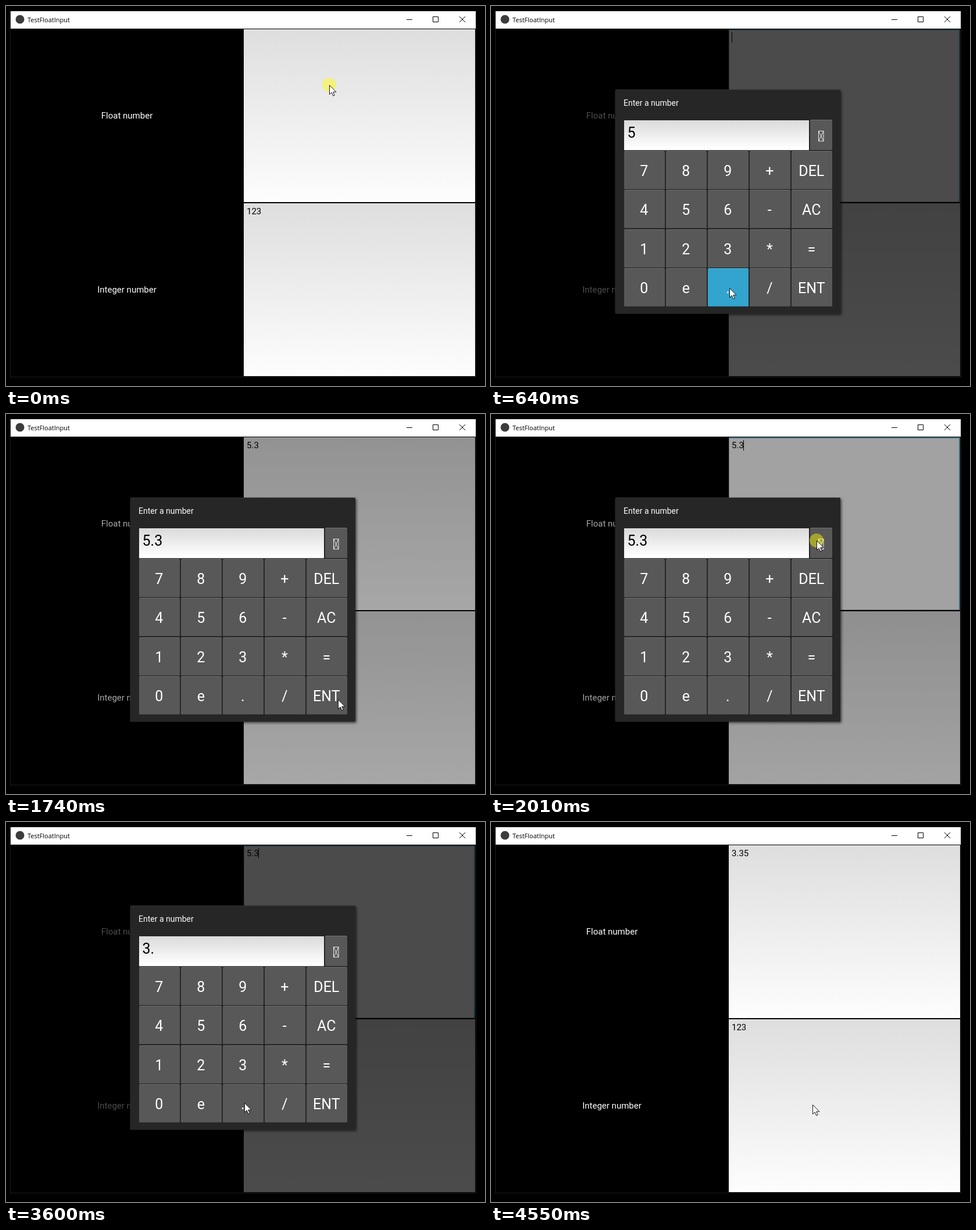
An HTML page for the animation above (4620 ms loop, 824 by 655 pixels).

```html
<!DOCTYPE html>
<html lang="en">
<head>
<meta charset="utf-8">
<title>TestFloatInput</title>
<style>
html, body { margin: 0; width: 100%; height: 100%; overflow: hidden; background: #000; }
svg { display: block; width: 824px; height: 655px; font-family: Roboto, sans-serif; }
.label { font-size: 15px; fill: #fff; text-anchor: middle; }
.value { font-size: 15px; fill: #000; }
.key { font-size: 25px; fill: #fff; text-anchor: middle; }
</style>
</head>
<body>
<svg viewBox="0 0 824 655">
  <defs>
    <linearGradient id="field" x2="0" y2="1">
      <stop stop-color="#dedede"/><stop offset="1" stop-color="#fdfdfd"/>
    </linearGradient>
    <linearGradient id="entry" x2="0" y2="1">
      <stop stop-color="#dadada"/><stop offset=".9" stop-color="#fdfdfd"/><stop offset="1" stop-color="#fff"/>
    </linearGradient>
    <filter id="shadow" x="-5%" y="-5%" width="112%" height="112%">
      <feDropShadow dx="2" dy="2" stdDeviation="2" flood-color="#000" flood-opacity=".6"/>
    </filter>
  </defs>
  <rect width="824" height="655"/>
  <rect x="7.5" y="8.5" width="801" height="631" fill="none" stroke="#1c1c1c"/>

  <rect x="8" y="9" width="800" height="30" fill="#fff"/>
  <circle cx="24" cy="23" r="7.5" fill="#3c3c3c"/>
  <text x="37" y="28" font-size="11" font-family="'Open Sans', sans-serif">TestFloatInput</text>
  <path d="M689 23.5h10M734.5 18.5h9v9h-9zM780 18l10 10M790 18l-10 10" fill="none" stroke="#000"/>

  <text class="label" x="208" y="194">Float number</text>
  <text class="label" x="208" y="494">Integer number</text>
  <rect x="409" y="40" width="398" height="298" fill="url(#field)"/>
  <g id="focus">
    <rect x="409" y="40" width="398" height="298" fill="#fbfbfb"/>
    <path d="M409.5 338V40.5M409 337.5h398" fill="none" stroke="#a8b4ba"/>
    <path d="M409 41h397v297" fill="none" stroke="#3f9fca" stroke-width="1.6"/>
  </g>
  <text id="floatText" class="value" x="414" y="59"></text>
  <path id="caret" d="M0 45v18" stroke="#000"/>
  <rect x="409" y="340" width="398" height="298" fill="url(#field)"/>
  <text class="value" x="414" y="359">123</text>

  <rect id="overlay" x="8" y="39" width="800" height="600"/>
  <g id="popup">
    <rect x="213.5" y="144" width="387.5" height="386.5" rx="2" fill="#282828" filter="url(#shadow)"/>
    <path d="M215 144.5h385" stroke="#343434"/>
    <text x="228" y="172" font-size="14" fill="#fff">Enter a number</text>
    <rect x="229" y="197" width="318" height="51.5" fill="url(#entry)"/>
    <text id="entryText" x="234.5" y="227" font-size="25"></text>
    <g id="keys"></g>
    <path d="M563.5 215.5h8.500v17.500h-8.500zl8.500 17.500M572 215.500l-8.500 17.500" fill="none" stroke="#fff" stroke-width=".9"/>
  </g>

  <g id="cursor">
    <circle id="halo" r="12" fill="#ff0" opacity=".46"/>
    <path d="M.5.500v16l3.700-3.500 2.600 6 2.500-1.100-2.600-5.700h5.300z" fill="#fff" stroke="#000" stroke-width=".9"/>
  </g>
</svg>
<script>
const LOOP = 4620;
const $ = id => document.getElementById(id);
const within = (t, spans) => spans.some(([a, b]) => t >= a && t < b);

// Keypad
const svgNode = (tag, attrs) => {
  const node = document.createElementNS('http://www.w3.org/2000/svg', tag);
  for (const name in attrs) node.setAttribute(name, attrs[name]);
  return $('keys').appendChild(node);
};
const faces = {};
function addKey(name, x, y, w, h) {
  faces[name] = svgNode('rect', { x, y, width: w, height: h, rx: 1.5, fill: '#585858' });
  svgNode('path', { d: `M${x + 1} ${y + .5}h${w - 2}`, stroke: '#fff', 'stroke-opacity': .16 });
  svgNode('path', { d: `M${x + 1} ${y + h - .5}h${w - 2}`, stroke: '#000', 'stroke-opacity': .12 });
}
addKey('back', 549, 196, 38, 52.5);
['7 8 9 + DEL', '4 5 6 - AC', '1 2 3 * =', '0 e . / ENT'].forEach((row, r) =>
  row.split(' ').forEach((name, c) => {
    const y = Math.round(250 + r * 67.3);
    addKey(name, 229 + c * 72, y, 70, 66);
    svgNode('text', { class: 'key', x: 263.3 + c * 72, y: y + 43 }).textContent = name;
  }));

// [time, x, y]
const path = [
  [0, 556, 136], [110, 556, 137], [370, 338, 352], [450, 338, 352],
  [570, 410, 486], [690, 410, 486], [860, 408, 421], [1060, 408, 421],
  [1440, 571, 492], [1760, 571, 492], [1920, 560, 218], [2340, 560, 218],
  [2450, 550, 275], [3060, 550, 275], [3270, 405, 420], [3380, 405, 420],
  [3460, 410, 484], [3620, 410, 484], [3700, 407, 421], [3790, 407, 421],
  [3890, 338, 352], [4020, 338, 352], [4280, 553, 487], [LOOP, 553, 487]
];
// [key, press, release]
const presses = [
  ['5', 380, 470], ['.', 560, 700], ['3', 900, 1010], ['ENT', 1550, 1680],
  ['DEL', 2460, 2570], ['DEL', 2700, 2890], ['DEL', 2970, 3060], ['3', 3290, 3390],
  ['.', 3470, 3580], ['3', 3700, 3800], ['5', 3900, 4010], ['ENT', 4300, 4420]
];
const halos = [[0, 90], [1910, 2070], [2690, 2850]].concat(
  presses.filter(p => p[1] !== 2700).map(p => [p[1] - 20, p[1] + 55]));
const openings = [[90, 1790], [1960, 4530]];
const focused = [[60, 1680], [1930, 4420]];
const caretOn = [[60, 790], [1290, 1680], [1930, 2630], [3130, 3630], [4130, 4420]];

function cursorAt(t) {
  const i = path.findIndex(p => p[0] > t);
  const [t0, x0, y0] = path[i - 1], [t1, x1, y1] = path[i];
  const u = (t - t0) / (t1 - t0), e = u * u * (3 - 2 * u);
  return [x0 + (x1 - x0) * e, y0 + (y1 - y0) * e];
}

function entryAt(t) {
  let text = t < 1930 ? '' : '5.3';
  for (const [key, , release] of presses) {
    if (release > t || (t >= 1930 && release < 1930) || key === 'ENT') continue;
    text = key === 'DEL' ? text.slice(0, -1) : text + key;
  }
  return text;
}

const show = (id, on) => { $(id).style.display = on ? '' : 'none'; };

function draw(t) {
  const span = openings.find(([a, b]) => t >= a && t < b);
  const fade = span ? Math.min(1, (t - span[0]) / 100, (span[1] - t) / 100) : 0;
  $('overlay').setAttribute('opacity', .7 * fade);
  show('popup', span);
  show('focus', within(t, focused));
  show('caret', within(t, caretOn));
  show('halo', within(t, halos));

  const value = t < 1680 ? '' : t < 4420 ? '5.3' : '3.35';
  $('floatText').textContent = value;
  $('caret').setAttribute('transform', `translate(${value ? 434.5 : 414.5})`);
  $('entryText').textContent = entryAt(t);

  const down = presses.find(([, a, b]) => t >= a && t < b);
  for (const name in faces)
    faces[name].setAttribute('fill', down && down[0] === name ? '#32a4ce' : '#585858');
  $('cursor').setAttribute('transform', `translate(${cursorAt(t).map(Math.round)})`);
}

const start = performance.now();
function tick() {
  draw((performance.now() - start) % LOOP);
  requestAnimationFrame(tick);
}
tick();
</script>
</body>
</html>
```
